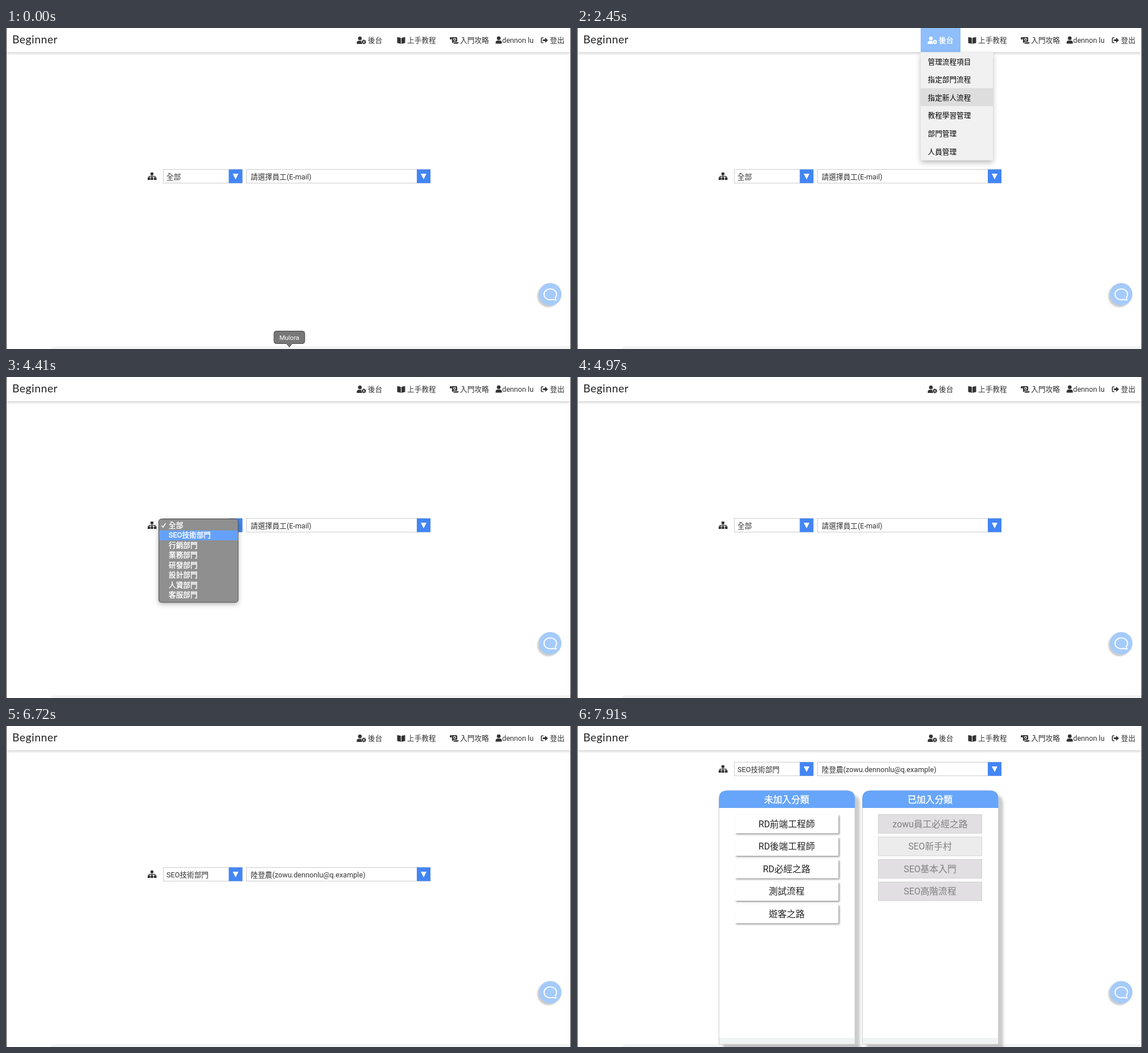
Write an HTML page that moves like this. It is 993x564 px and loops after 8 s.

```html
<!DOCTYPE html>
<html lang="zh-Hant">
<head>
<meta charset="utf-8">
<style>
  html, body { margin: 0; width: 100%; height: 100%; overflow: hidden; background: #fff; }
  svg { display: block; width: 993px; height: 564px; }
  text { font: 12.65px Roboto, "Noto Sans CJK TC", "Noto Sans CJK", sans-serif; fill: #333; white-space: pre; }
  .brand { font: 400 19.3px Lato, sans-serif; letter-spacing: .5px; fill: #222; }
  .icon { fill: #333; stroke: none; }
  .line { fill: none; stroke: #333; stroke-width: 1.6; }
  .active text, .popup text, .title { fill: #fff; stroke: #fff; stroke-width: .4; }
  .active .icon { fill: #fff; }
  .active .line { stroke: #fff; }
  .big { font-size: 15.8px; text-anchor: middle; }
  .header-shadow { filter: drop-shadow(0 2px 2px #0003); }
  .menu-shadow { filter: drop-shadow(0 4px 5px #0004); }
  .popup-shadow { filter: drop-shadow(0 3px 4px #0004); }
  .panel-shadow { filter: drop-shadow(8px 8px 2px #0003); }
  .card-shadow { filter: drop-shadow(2px 2px 1.5px #0006); }
  .chat-shadow { filter: drop-shadow(-3px 3px 1px #0003); }
</style>
</head>
<body>
<svg viewBox="0 0 993 564">
  <defs>
    <linearGradient id="bleed">
      <stop offset="0" stop-color="#5f7fae" stop-opacity="0"/>
      <stop offset="1" stop-color="#5f7fae"/>
    </linearGradient>
  </defs>
  <rect width="993" height="564" fill="#fff"/>
  <path d="M78 564q2-5 8-5H992v5z" fill="#f3f3f3"/>
  <g id="panels"></g>
  <g id="filters">
    <path class="icon" d="M254 254h5v4.500h-5zM249 262.500h4.500v4.500H249zM254.300 262.500h4.500v4.500h-4.500zM260 262.500h4.500v4.500H260z"/>
    <path class="line" style="stroke-width:1.2" d="M256.500 258v5M251.200 263v-2.400h11V263"/>
  </g>
  <g id="popups"></g>

  <rect class="header-shadow" x="1" width="991" height="42.500" fill="#fff"/>
  <text class="brand" x="11" y="27">Beginner</text>
  <g id="admin">
    <rect id="adminBack" x="604" width="70" height="42.500" fill="#8ebefb"/>
    <circle class="icon" cx="622" cy="18.300" r="3.300"/>
    <path class="icon" d="M616.500 28v-2q0-3.500 3.500-3.500h4.500q-.5 3 1.500 5.500z"/>
    <circle class="line" cx="629" cy="24.500" r="2.300" style="stroke-width:2"/>
    <path class="line" d="M629 20.500v1.500M629 27v1.500M625.500 22.500l1.300.8M631.200 25.700l1.300.8M625.500 26.500l1.300-.8M631.200 23.300l1.300-.8"/>
    <text x="636" y="26">後台</text>
  </g>
  <path class="icon" d="M687.500 16q3.500 0 6.500 1.500V28q-2.500-1.500-6.500-1.500zM701.500 16q-3.500 0-6.500 1.500V28q2.500-1.500 6.500-1.500z"/>
  <text x="705" y="26">上手教程</text>
  <path class="icon" d="M780 20v-2q0-2 1.700-2t1.700 2v2zM782.500 16H791q2 0 2 2v6h-6.500v2.500q-2.700 0-2.700-2.500v-6q0-1.500-1.300-2zM787.500 25H795.500q0 2.500-2.500 2.500h-7q1.500-.5 1.500-2.500z"/>
  <circle cx="788.500" cy="20" r="1.900" fill="none" stroke="#fff" stroke-width="1.100"/>
  <text x="798" y="26">入門攻略</text>
  <circle class="icon" cx="866" cy="18" r="3.300"/>
  <path class="icon" d="M860.500 27.500V26q0-4 4-4h3q4 0 4 4v1.500z"/>
  <text x="872" y="26">dennon lu</text>
  <path class="line" d="M944.500 17.300H942q-1.200 0-1.200 1.200v6q0 1.200 1.200 1.200h2.500"/>
  <path class="icon" d="M943.500 20h4v-3.300l5 4.800-5 4.800V23h-4z"/>
  <text x="956" y="26">登出</text>

  <g id="menu"></g>
  <g id="tip">
    <path d="M475 532.500h46q4 0 4 4v14q0 4-4 4h-18l-5 6-5-6H475q-4 0-4-4v-14q0-4 4-4z" fill="#777" stroke="#444"/>
    <text x="498" y="547.500" text-anchor="middle" style="font-size:11.300px;fill:#fff">Mulora</text>
  </g>
  <circle class="chat-shadow" cx="956.500" cy="467.800" r="19.800" fill="#a5cbfb"/>
  <path d="M965.500 473.500a11 9.500 0 1 0-5 3.300q3 1.300 6.500 1-2-2-1.500-4.300z" fill="none" stroke="#fff" stroke-width="1.900" stroke-linejoin="round"/>
  <path d="M.5 0V564M992.500 0V564" stroke="#333"/>
</svg>
<script>
const $ = id => document.getElementById(id);
const USER = "陸登農(zowu.dennonlu@q.example)";
const TEAM = "SEO技術部門";
const HINT = "請選擇員工(E-mail)";
const ROW = 17.5;

const rect = (x, y, w, h, rest = "") => `<rect x="${x}" y="${y}" width="${w}" height="${h}" ${rest}/>`;
const text = (x, y, label, rest = "") => `<text x="${x}" y="${y}" ${rest}>${label}</text>`;
const add = (id, markup) => $(id).insertAdjacentHTML("beforeend", markup);

function addSelect(id, x, w, pad) {
  const right = x + w;
  add("filters", rect(x + .5, 248.5, w - 1, 24, 'fill="#fff" stroke="#ccc"')
    + rect(right - 24, 248.5, 24, 24, 'fill="#4285f4"')
    + `<path d="M${right - 17} 256h10l-5 10z" fill="#fff"/>`
    + text(x + pad, 265.5, "", `id="${id}"`));
}

function addPopup(id, x, w, items, glow = "") {
  const rows = items.map((item, i) => text(x + 17.5, 264.8 + i * ROW, item)).join("");
  const h = items.length * ROW + 6.5;
  add("popups", `<g id="${id}" class="popup">
    ${rect(x, 249.5, w, h, 'rx="4.5" fill="#8f8f8f" stroke="#555" class="popup-shadow"')}${glow}
    ${rect(x + .5, 252, w - 1, ROW, `id="${id}Mark" fill="#65a1fc"`)}
    <path d="M${x + 5} 261l2.500 3 4.500-7" fill="none" stroke="#fff" stroke-width="1.500"/>${rows}</g>`);
}

function addPanel(x, title, cards, joined) {
  const top = `M${x} 144V128q0-14.500 14.500-14.500h210q14.500 0 14.500 14.500V144`;
  const mid = x + 119;
  add("panels", `<path class="panel-shadow" d="${top}V559H${x}z" fill="#fff" stroke="#ccc"/>`
    + rect(x + .5, 548, 238, 10.5, 'fill="#f0f3f3"')
    + `<path d="${top}z" fill="#66a5fa"/>`
    + text(mid, 134.5, title, 'class="big title"')
    + cards.map((card, i) => {
      const y = 155.5 + i * 39.5;
      const look = joined ? `fill="${i === 1 ? "#ececec" : "#e1dfe1"}" stroke="#d2d2d2"` : 'fill="#fff" class="card-shadow"';
      return rect(mid - 91, y, 182, 33, look)
        + text(mid, y + 22.3, card, `class="big" style="fill:${joined ? "#808080" : "#222"}"`);
    }).join(""));
}

addSelect("team", 276, 139.5, 6);
addSelect("staff", 422, 324, 8);
addPopup("teams", 268.5, 139.5, ["全部", TEAM, "行銷部門", "業務部門", "研發部門", "設計部門", "人資部門", "客服部門"]);
addPopup("people", 414.5, 324, [HINT, "Rob Sheng(robsheng@zowu.example)", USER, "孟語荷(ellismeng@zowu)"],
  rect(704, 250, 34, 26, 'fill="url(#bleed)" opacity=".6"'));
addPanel(249.5, "未加入分類", ["RD前端工程師", "RD後端工程師", "RD必經之路", "測試流程", "遊客之路"], false);
addPanel(501.5, "已加入分類", ["zowu員工必經之路", "SEO新手村", "SEO基本入門", "SEO高階流程"], true);
add("menu", rect(604, 42.5, 127, 190, 'fill="#f1f1f1" class="menu-shadow"')
  + rect(604, 42.5, 127, 31.6, 'id="menuMark" fill="#ddd"')
  + ["管理流程項目", "指定部門流程", "指定新人流程", "教程學習管理", "部門管理", "人員管理"]
    .map((item, i) => text(616.5, 63.5 + i * 31.6, item, 'style="fill:#000"')).join(""));

// Number of the given moments already passed, minus one
const stepAt = (t, moments) => moments.filter(m => t >= m).length - 1;
const fadeOut = (t, from, length) => Math.max(0, Math.min(1, 1 - (t - from) / length));

function show(id, opacity) {
  $(id).style.display = opacity > 0 ? "" : "none";
  $(id).style.opacity = opacity;
}
function mark(id, row, pitch) {
  $(id).style.display = row < 0 ? "none" : "";
  $(id).setAttribute("transform", `translate(0 ${row * pitch})`);
}

function draw(now) {
  const t = now % 8000;
  show("tip", fadeOut(t, 100, 300));

  const menuOpen = t >= 1680 && t < 2660;
  show("menu", +menuOpen);
  show("adminBack", +menuOpen);
  $("admin").classList.toggle("active", menuOpen);
  mark("menuMark", stepAt(t, [1960, 2170, 2310]), 31.6);

  show("teams", t < 3850 ? 0 : fadeOut(t, 4690, 210));
  mark("teamsMark", stepAt(t, [3850, 4270]), ROW);
  show("people", t < 5600 ? 0 : fadeOut(t, 6370, 210));
  mark("peopleMark", stepAt(t, [5600, 5880, 6090]), ROW);

  $("team").textContent = t < 5040 ? "全部" : TEAM;
  $("staff").textContent = t < 6440 ? HINT : USER;

  const loaded = t >= 6930;
  show("panels", +loaded);
  $("filters").setAttribute("transform", `translate(0 ${loaded ? -185 : 0})`);
}

const start = performance.now();
(function tick() {
  draw(performance.now() - start);
  requestAnimationFrame(tick);
})();
</script>
</body>
</html>
```
